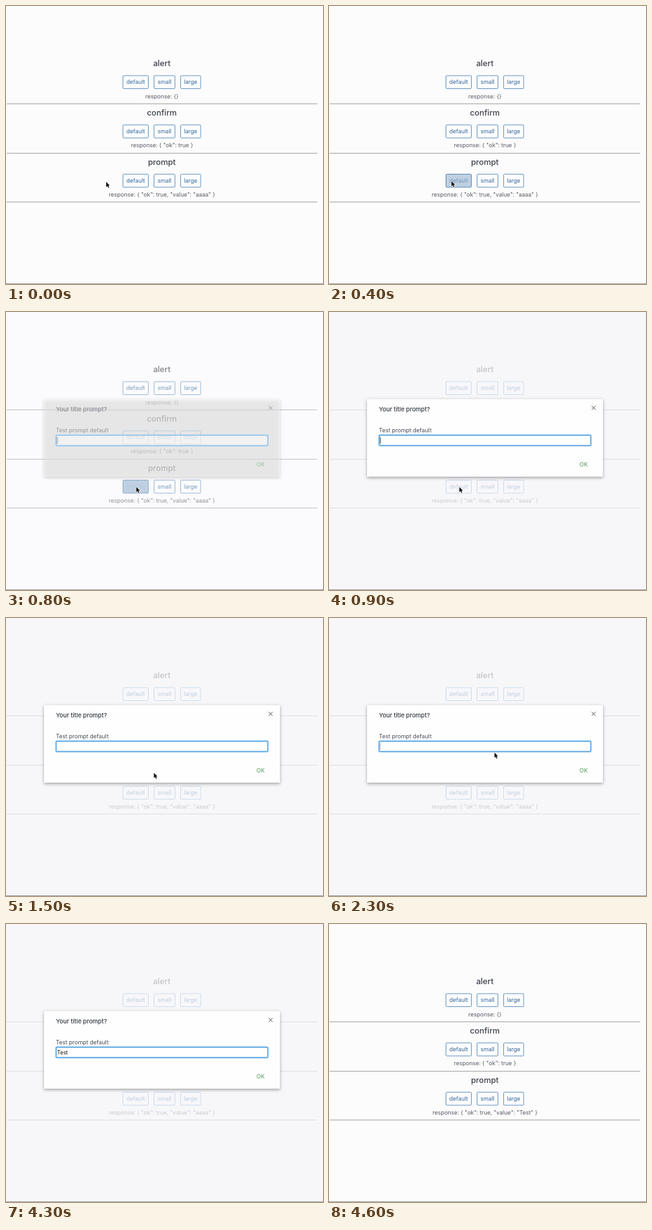
An HTML page with a canvas for the animation above (5000 ms loop, 500x439 px).

```html
<!DOCTYPE html>
<html lang="en">
<head>
<meta charset="utf-8">
<title>Dialog demo</title>
<style>
  html, body { margin: 0; width: 100%; height: 100%; overflow: hidden; background: #fdfcfd; }
  canvas { display: block; width: 500px; height: 439px; }
</style>
</head>
<body>
<canvas id="stage"></canvas>
<script>
const W = 500, H = 439, LOOP = 5000, STEP = 100;
const canvas = document.getElementById('stage');
const ctx = canvas.getContext('2d');
const dpr = window.devicePixelRatio || 1;
canvas.width = W * dpr;
canvas.height = H * dpr;

const SECTION_PITCH = 77.8;
const BUTTONS = [
  { label: 'default', x: 184.5, w: 40 },
  { label: 'small', x: 233.5, w: 33 },
  { label: 'large', x: 275.5, w: 31.5 }
];
const KEYS = [[2800, 'T'], [2900, 'Te'], [3100, 'Tes'], [3400, 'Test']];

const clamp = v => Math.max(0, Math.min(1, v));
const ramp = (t, from, to) => clamp((t - from) / (to - from));
const smooth = v => v * v * (3 - 2 * v);
const mix = (a, b, v) => a + (b - a) * v;
const mixColor = (a, b, v) => `rgb(${a.map((c, i) => Math.round(mix(c, b[i], v))).join(',')})`;

function text(str, x, y, size, color, { weight = 400, align = 'left' } = {}) {
  ctx.font = `${weight} ${size}px Inter, sans-serif`;
  ctx.textAlign = align;
  ctx.fillStyle = color;
  ctx.fillText(str, x, y);
}

function rect(x, y, w, h, color) {
  ctx.fillStyle = color;
  ctx.fillRect(x, y, w, h);
}

function roundRect(x, y, w, h, r) {
  ctx.beginPath();
  ctx.roundRect(x, y, w, h, r);
}

function drawButton({ label, x, w }, y, hover) {
  roundRect(x, y, w, 20.5, 1);
  ctx.fillStyle = mixColor([253, 253, 254], [66, 119, 169], hover);
  ctx.fill();
  ctx.strokeStyle = mixColor([93, 145, 192], [58, 109, 158], hover);
  ctx.lineWidth = 1;
  ctx.stroke();
  text(label, x + w / 2, y + 13.4, 9, mixColor([52, 103, 154], [238, 244, 250], hover), { align: 'center' });
}

function drawSection(index, title, response, hover = 0) {
  const y = index * SECTION_PITCH;
  text(title, 245.8, y + 95, 12.7, '#3d434b', { weight: 500, align: 'center' });
  BUTTONS.forEach((b, i) => drawButton(b, y + 110, i === 0 ? hover : 0));
  text('response: ' + response, 246, y + 145.6, 9, '#555a60', { align: 'center' });
  rect(1, Math.round(y + 153.7), 490, 1, '#a0a0a2');
}

function drawPage(t) {
  const value = t < 4400 ? 'aaaa' : 'Test';
  const hover = ramp(t, 300, 600) * (1 - ramp(t, 700, 900));
  rect(0, 0, W, H, '#fdfcfd');
  drawSection(0, 'alert', '{}');
  drawSection(1, 'confirm', '{ "ok": true }');
  drawSection(2, 'prompt', `{ "ok": true, "value": "${value}" }`, hover);
}

function caretAlpha(t) {
  if (t >= 2800) return 1 - ramp(t, 3800, 4100);
  // Soft blink: fades out, rests, fades back in every 1200 ms.
  const p = (t - 900 + 1200) % 1200;
  return p < 600 ? 1 - ramp(p, 0, 300) : ramp(p, 600, 800);
}

function drawInput(t) {
  roundRect(79, 194.5, 334, 16.5, 1.5);
  ctx.fillStyle = '#fff';
  ctx.fill();
  ctx.strokeStyle = '#a9d2f3';
  ctx.lineWidth = 2.6;
  ctx.stroke();
  ctx.strokeStyle = '#5ea7e0';
  ctx.lineWidth = 1.3;
  ctx.stroke();

  const typed = KEYS.reduce((s, [at, str]) => t >= at ? str : s, '');
  text(typed, 80.6, 206, 8.5, '#111');
  const caretX = 80.5 + ctx.measureText(typed).width;
  rect(caretX, 197.5, 0.9, 10.5, `rgba(20,20,20,${caretAlpha(t)})`);
}

function drawDialog(t) {
  ctx.save();
  ctx.shadowColor = 'rgba(0,0,0,0.34)';
  ctx.shadowBlur = 5 * dpr;
  ctx.shadowOffsetY = 1.5 * dpr;
  rect(60, 137.5, 372, 122.5, '#fefefe');
  ctx.restore();

  text('Your title prompt?', 78.7, 157.2, 9.5, '#33383f', { weight: 500 });
  text('Test prompt default', 78.7, 190.3, 9, '#484d53');
  text('OK', 401.5, 243.9, 9.1, '#559a59', { align: 'center' });

  ctx.beginPath();
  ctx.moveTo(414.4, 148.4);
  ctx.lineTo(420.4, 154.4);
  ctx.moveTo(420.4, 148.4);
  ctx.lineTo(414.4, 154.4);
  ctx.strokeStyle = '#44484c';
  ctx.lineWidth = 1;
  ctx.stroke();

  drawInput(t);
}

function drawPointer(t) {
  if (t >= 2800) return;
  const approach = smooth(ramp(t, 0, 600));
  const leave = smooth(ramp(t, 1200, 1800));
  ctx.save();
  ctx.translate(mix(mix(158, 205.5, approach), 261, leave),
                mix(mix(277.8, 276.2, approach), 212.6, leave));
  ctx.beginPath();
  [[0, 0], [0, 8.2], [1.9, 6.5], [3.2, 9.5], [4.6, 8.9], [3.3, 6], [5.7, 5.8]]
    .forEach(([x, y]) => ctx.lineTo(x, y));
  ctx.closePath();
  ctx.lineJoin = 'round';
  ctx.strokeStyle = '#fff';
  ctx.lineWidth = 1.3;
  ctx.stroke();
  ctx.fillStyle = '#111';
  ctx.fill();
  ctx.restore();
}

function draw(t) {
  ctx.setTransform(dpr, 0, 0, dpr, 0, 0);
  drawPage(t);

  const open = ramp(t, 700, 900) * (1 - ramp(t, 4300, 4500));
  if (open > 0) {
    ctx.globalAlpha = open;
    rect(0, 0, W, H, 'rgba(246,246,250,0.73)');
    drawDialog(t);
    ctx.globalAlpha = 1;
  }

  rect(0, 438, W, 1, '#98989a');
  drawPointer(t);
}

const start = performance.now();
function tick() {
  const t = (performance.now() - start) % LOOP;
  draw(Math.floor(t / STEP) * STEP);
  requestAnimationFrame(tick);
}
tick();
</script>
</body>
</html>
```
